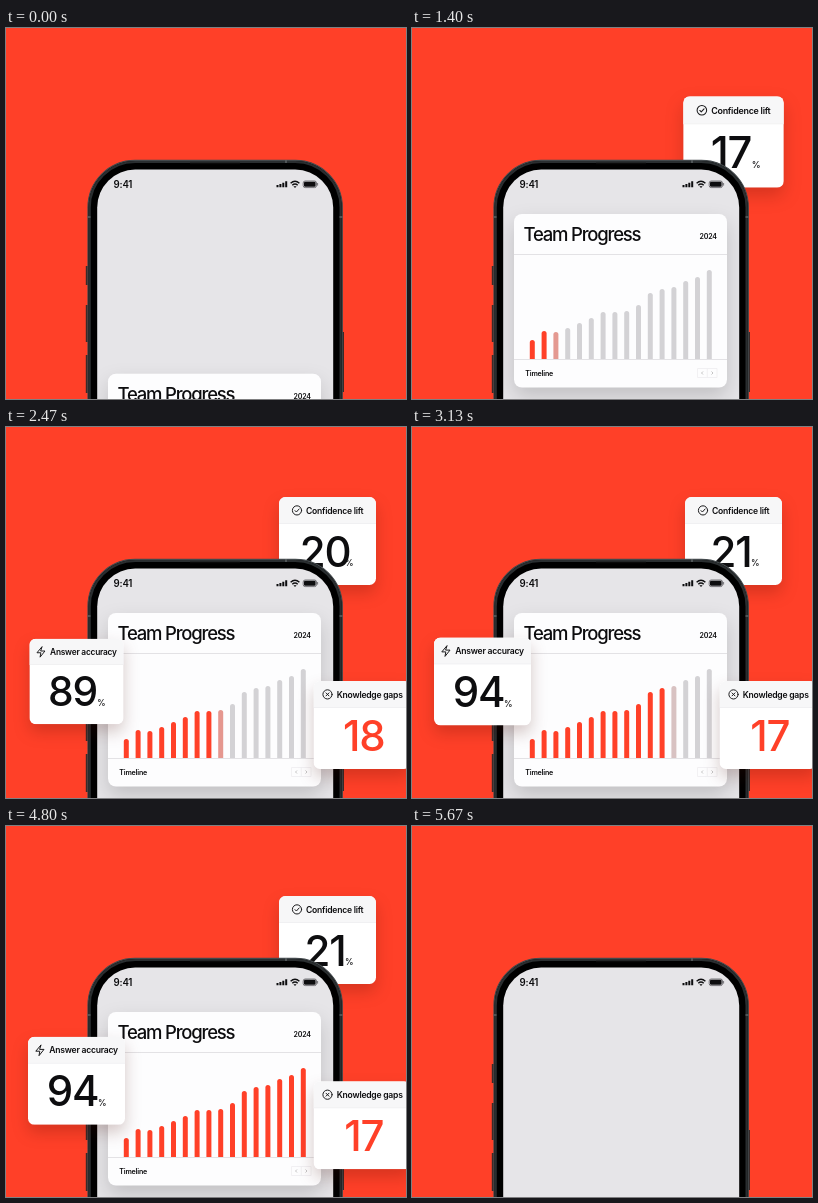
Animation of 400x371 px, one loop 5.74 s. Source, as an HTML page:

```html
<!DOCTYPE html>
<html lang="en">
<head>
<meta charset="utf-8">
<title>Team Progress</title>
<style>
  html, body { margin: 0; width: 100%; height: 100%; overflow: hidden; background: #ff4028; }
  svg { display: block; width: 400px; height: 371px; font-family: Inter, "Liberation Sans", sans-serif; }
  text { fill: #0d0d0f; }
  .main { filter: drop-shadow(0 9px 10px rgba(0, 0, 0, .16)); }
  .card { filter: drop-shadow(0 8px 8px rgba(70, 10, 0, .22)); }
  .label { font-size: 8.6px; font-weight: 600; letter-spacing: -.25px; }
  .number { font-size: 42px; font-weight: 500; letter-spacing: -1.2px; text-anchor: middle; }
  .small { font-size: 7.1px; font-weight: 600; letter-spacing: -.2px; }
  .line { fill: none; stroke: #1a1a1c; stroke-width: 1; stroke-linecap: round; stroke-linejoin: round; }
</style>
</head>
<body>
<svg viewBox="0 0 400 371">
  <defs>
    <clipPath id="screen"><rect x="91.2" y="141.5" width="236" height="300" rx="38"/></clipPath>
    <clipPath id="face"><rect width="97" height="88" rx="6.5"/></clipPath>
  </defs>
  <rect width="400" height="371" fill="#ff4028"/>
  <g id="back"></g>

  <g id="phone">
    <path d="M80.800 238v19M80.800 277v37M80.800 327v38M337 304v60" stroke="#3a2a29" stroke-width="2"/>
    <rect x="82" y="132.300" width="254.300" height="320" rx="47" fill="#000" stroke="#43494c" stroke-width="1.200"/>
    <rect x="83.700" y="134" width="250.900" height="320" rx="45.500" fill="none" stroke="#2a2e30" stroke-width="2.200"/>
    <path d="M184 135.500h50" stroke="#0a0a0a" stroke-width="1.500"/>
    <path d="M81.500 189h3M333.500 189h3M280 132v3" stroke="#5d6364" stroke-width="1.500"/>
    <rect x="91.200" y="141.500" width="236" height="300" rx="38" fill="#e6e5e8"/>
    <text x="107.500" y="160" font-size="9.700" font-weight="600" letter-spacing="-.2">9:41</text>
    <path d="M271.500 159.300v-2.300M274.400 159.300v-3.400M277.300 159.300v-4.600M280.200 159.300v-6.100" stroke="#0d0d0f" stroke-width="2"/>
    <g fill="none" stroke="#0d0d0f" stroke-width="1.500">
      <path d="M284.600 155.200q4.400-3.800 8.800 0M286.300 157.200q2.700-2.300 5.400 0"/>
      <path d="M288 158.600h2l-1 1z" stroke-width=".8"/>
    </g>
    <rect x="297.200" y="153" width="13.300" height="6.600" rx="2" fill="none" stroke="#5a595d" stroke-width=".8"/>
    <rect x="298" y="153.800" width="11.600" height="5" rx="1.200" fill="#0d0d0f"/>
    <path d="M311.600 155v2.600" stroke="#77767a"/>
  </g>

  <g clip-path="url(#screen)">
    <g id="main" class="main">
      <rect x="102" y="186" width="213" height="173.500" rx="8" fill="#fdfdfe"/>
      <path d="M102 226.500h213M102 331.500h213" stroke="#e3e2e5"/>
      <text x="111.500" y="213" font-size="18.500" font-weight="500" letter-spacing="-1.200">Team Progress</text>
      <text class="small" x="287.500" y="211">2024</text>
      <g id="bars"></g>
      <text class="small" x="113.300" y="347.700">Timeline</text>
      <path d="M285.500 340.500h19.500v9h-19.500zM295.300 340.500v9" fill="none" stroke="#efeef0" stroke-width=".8"/>
      <path d="M291 343.500l-1.500 1.500 1.500 1.500M299.500 343.500l1.500 1.500-1.500 1.500" fill="none" stroke="#aaa" stroke-width=".7"/>
    </g>
  </g>
  <g id="front"></g>
</svg>
<script>
const LOOP = 5740, RED = [255, 64, 40], GREY = [211, 210, 213];
const $ = id => document.getElementById(id);
const clamp = v => Math.max(0, Math.min(1, v));

const ring = '<circle r="4.6"/>';
const cards = [
  { layer: 'back', x: 273, y: 70, label: 'Confidence lift', icon: ring + '<path d="M-2 .2l1.400 1.400 2.700-3"/>',
    iconX: 18, textX: 27, numX: 46, percentX: 66, color: '#0d0d0f',
    start: 1000, count: [960, 1800, 0, 21], exit: [4766, .005] },
  { layer: 'front', x: 307.5, y: 254, label: 'Knowledge gaps', icon: ring + '<path d="M-1.500-1.500l3 3M1.500-1.500l-3 3"/>',
    iconX: 14, textX: 23.3, numX: 50.3, color: '#ff4028',
    start: 1600, count: [1600, 1100, 40, 17], exit: [4520, .0038] },
  { layer: 'front', x: 22, y: 210.5, label: 'Answer accuracy', icon: '<path d="M.8-5l-5 6h4l-.8 4.500 5-6.300h-4z"/>',
    iconX: 12, textX: 21.3, numX: 44.5, percentX: 70, color: '#0d0d0f',
    start: 2200, count: [2200, 930, 60, 94], exit: [4626, .0042] }
];

for (const c of cards) {
  $(c.layer).insertAdjacentHTML('beforeend', `<g class="card"><g clip-path="url(#face)">
    <rect width="97" height="88" fill="#fff"/><rect width="97" height="26.500" fill="#f7f7f8"/>
    <path d="M0 26.500h97" stroke="#ededef" stroke-width=".7"/></g>
    <g class="line" transform="translate(${c.iconX} 13.400)">${c.icon}</g>
    <text class="label" x="${c.textX}" y="16.700">${c.label}</text>
    <text class="number" x="${c.numX}" y="69.500" style="fill:${c.color}"></text>
    ${c.percentX ? `<text x="${c.percentX}" y="69" font-size="8.600" font-weight="500">%</text>` : ''}</g>`);
  c.node = $(c.layer).lastElementChild;
  c.number = c.node.querySelector('.number');
}

const tops = [312, 303, 304, 300, 295, 290, 284, 284, 283, 277, 265, 261, 259, 253, 249, 242];
$('bars').innerHTML = tops.map((y, i) => {
  const x = 117.8 + 11.8 * i;
  return `<path d="M${x} 331V${y + 2.5}a2.500 2.500 0 0 1 5 0V331z"/>`;
}).join('');
const bars = [...$('bars').children];

// Slight overshoot, peaking at two thirds of the way
const pop = u => { const v = clamp(u) - 1; return 1 + 2 * v ** 3 + v ** 2; };
const expoOut = u => u >= 1 ? 1 : 1 - 2 ** (-10 * Math.max(0, u));
const fall = (t, [start, speed]) => (speed * Math.max(0, t - start)) ** 4;

function mainOffset(t) {
  if (t > LOOP - 58) t -= LOOP;
  return t < 2000 ? 217 * (1 - clamp((t + 58) / 800)) ** 4 : fall(t, [4774, .0042]);
}

function countAt(t, [start, length, from, to]) {
  const v = from + (to - from) * expoOut((t - start) / length);
  return to > from ? Math.floor(v) : Math.ceil(v);
}

function draw(t) {
  $('main').setAttribute('transform', `translate(0 ${mainOffset(t)})`);
  bars.forEach((bar, i) => {
    const k = clamp((t - 975 - 178 * i) / 178);
    bar.setAttribute('fill', `rgb(${GREY.map((g, j) => Math.round(g + (RED[j] - g) * k))})`);
  });
  for (const c of cards) {
    const s = pop((t - c.start) / 600), drop = fall(t, c.exit);
    c.node.style.display = t > c.start && drop < 320 ? '' : 'none';
    c.node.setAttribute('transform',
      `translate(${c.x + 48.5} ${c.y + 44 + drop}) scale(${s}) translate(-48.5 -44)`);
    c.number.textContent = countAt(t, c.count);
  }
}

const begin = performance.now();
function frame() {
  draw((performance.now() - begin) % LOOP);
  requestAnimationFrame(frame);
}
draw(0);
requestAnimationFrame(frame);
</script>
</body>
</html>
```
